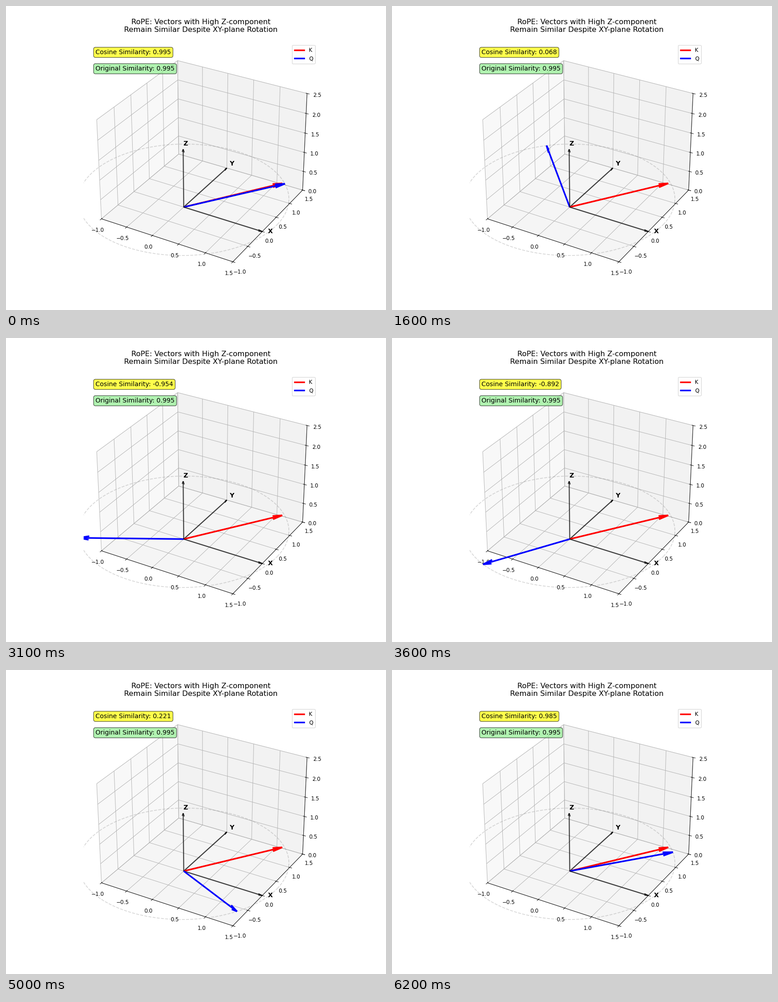
Animation, 837 px wide and 669 px high, one loop 6300 ms. Source, as a matplotlib script:

```python
import numpy as np
import matplotlib.pyplot as plt
from matplotlib.animation import FuncAnimation

DPI = 83.7
SIZE = 10, 7.993  # inches: 837 x 669 pixels
FRAMES, INTERVAL = 63, 100
STEP = 0.1  # radians per frame

K = np.array([1.2, 1.3, 0.2])
Q = np.array([1.3, 1.2, 0.3])


def rotate_z(v, angle):
    c, s = np.cos(angle), np.sin(angle)
    return np.array([c * v[0] - s * v[1], s * v[0] + c * v[1], v[2]])


def cosine(a, b):
    return a @ b / (np.linalg.norm(a) * np.linalg.norm(b))


def arrow(v, color, **style):
    return ax.quiver(0, 0, 0, *v, color=color, **style)


def vector(v, color, label=None):
    return arrow(v, color, linewidth=3, arrow_length_ratio=0.1, label=label)


def badge(y, text, color):
    return ax.text2D(0.05, y, text, transform=ax.transAxes, fontsize=12,
                     bbox=dict(boxstyle="round", facecolor=color, alpha=0.7))


plt.rcParams["font.family"] = "DejaVu Sans"
fig = plt.figure(figsize=SIZE, dpi=DPI)
ax = fig.add_subplot(projection="3d")
ax.set_title("RoPE: Vectors with High Z-component\n"
             "Remain Similar Despite XY-plane Rotation", fontsize=14, pad=20)

ax.set(xlim=(-1, 1.5), ylim=(-1, 1.5), zlim=(0, 2.5))

# Coordinate axes
for name, unit in zip("XYZ", np.eye(3)):
    arrow(1.5 * unit, "black", alpha=0.7, linewidth=2, arrow_length_ratio=0.05)
    ax.text(*(1.6 * unit), name, fontsize=12, fontweight="bold")

# Path of the rotating tip
turn = np.linspace(0, 2 * np.pi, 100)
radius = np.hypot(Q[0], Q[1])
ax.plot(radius * np.cos(turn), radius * np.sin(turn), np.full_like(turn, Q[2]),
        "--", color="gray", alpha=0.3)

vector(K, "red", "K")
moving = [vector(Q, "blue", "Q")]
ax.legend(loc="upper right")

score = badge(0.95, "", "yellow")
badge(0.88, f"Original Similarity: {cosine(K, Q):.3f}", "lightgreen")


def update(i):
    tip = rotate_z(Q, STEP * i)
    moving.pop().remove()
    moving.append(vector(tip, "blue"))
    score.set_text(f"Cosine Similarity: {cosine(K, tip):.3f}")
    return moving[0], score


anim = FuncAnimation(fig, update, frames=FRAMES, interval=INTERVAL,
                     repeat=True, repeat_delay=0, blit=False)
plt.show()
```
